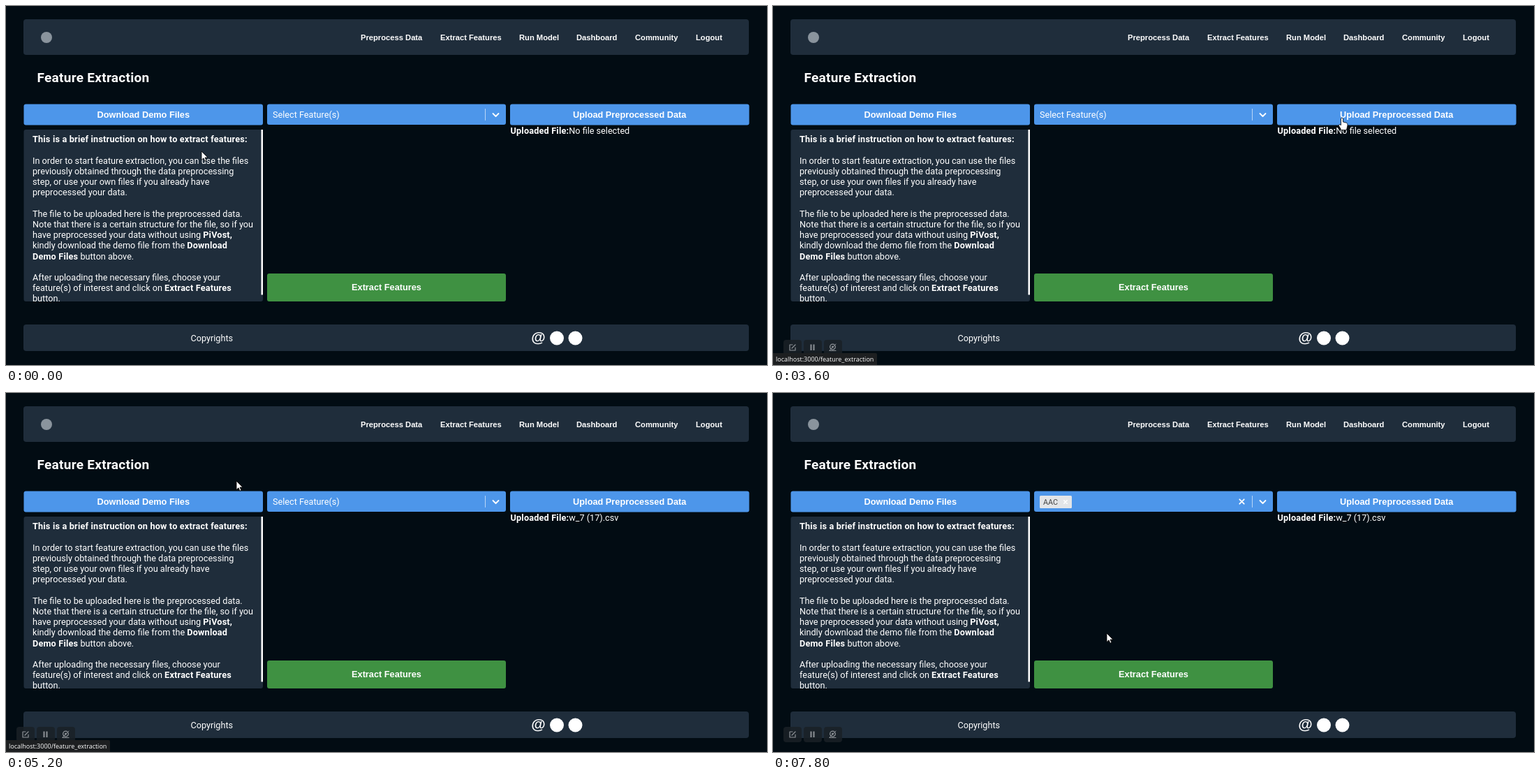
Animation, 1090 px wide and 514 px high, one loop 8000 ms. Source, as an HTML page:

```html
<!DOCTYPE html>
<html lang="en">
<head>
<meta charset="utf-8">
<title>Feature Extraction</title>
<style>
html, body { margin: 0; height: 100%; overflow: hidden; background: #020c13; }
svg { display: block; width: 100vw; height: 100vh; }
text { white-space: pre; fill: #fff; }
.body { font-family: Roboto, sans-serif; }
.body.b, .body .b { font-weight: 700; letter-spacing: .015em; }
.btn { font-family: "Liberation Sans", Arial, sans-serif; font-weight: 700; }
.ui { font-family: "Open Sans", "Noto Sans", sans-serif; }
.line { fill: none; stroke-linecap: round; stroke-linejoin: round; }
.shadow { filter: drop-shadow(0 4px 9px #000); }
</style>
</head>
<body>
<svg id="stage" viewBox="0 0 1090 514"></svg>
<script>
const CARD = '#1f2d3b', BLUE = '#4d96ea', GREEN = '#1d8a50', FOLDER = '#f7cd62';

const rect = (x, y, w, h, fill, more = '') =>
  `<rect x="${x}" y="${y}" width="${w}" height="${h}" fill="${fill}" ${more}/>`;
const circle = (x, y, r, fill) => `<circle cx="${x}" cy="${y}" r="${r}" fill="${fill}"/>`;
const line = (d, color = '#fff', w = 1) =>
  `<path class="line" d="${d}" stroke="${color}" stroke-width="${w}"/>`;
const shape = (d, fill) => `<path d="${d}" fill="${fill}"/>`;
// y is the middle of the capitals
const text = (cls, size, x, y, str, more = '') =>
  `<text class="${cls}" font-size="${size}" x="${x}" y="${y + size * .35}" ${more}>${str}</text>`;
const group = (id, inner, more = '') => `<g id="${id}" ${more}>${inner}</g>`;

const MID = 'text-anchor="middle"', END = 'text-anchor="end"';
const body = (x, y, str, more) => text('body', 12.67, x, y, str, more);
const ui = (x, y, str, more) => text('ui', 9, x, y, str, more);
const chevron = (x, y, r, color, w) =>
  line(`M${x - r} ${y - r / 2}l${r} ${r} ${r} ${-r}`, color, w);
const arrowRight = (x, y, color) => line(`M${x - 1.5} ${y - 3}l3 3-3 3`, color);
const cross = (x, y, r, color, w) =>
  line(`M${x - r} ${y - r}l${2 * r} ${2 * r}m0 ${-2 * r}l${-2 * r} ${2 * r}`, color, w);
const folder = (x, y, fill = FOLDER) =>
  shape(`M${x - 6} ${y - 5}h4l2 2h6v8h-12z`, fill);
const sheet = (x, y) => rect(x - 5, y - 5, 10, 10, GREEN);

function page() {
  const nav = [[508, 'Preprocess Data'], [622, 'Extract Features'], [735, 'Run Model'],
    [817, 'Dashboard'], [901, 'Community'], [988, 'Logout']];
  const b = s => `<tspan class="b">${s}</tspan>`;
  const help = [
    b('This is a brief instruction on how to extract features:'), '',
    'In order to start feature extraction, you can use the files',
    'previously obtained through the data preprocessing',
    'step, or use your own files if you already have',
    'preprocessed your data.', '',
    'The file to be uploaded here is the preprocessed data.',
    'Note that there is a certain structure for the file, so if you',
    `have preprocessed your data without using ${b('PiVost,')}`,
    `kindly download the demo file from the ${b('Download')}`,
    `${b('Demo Files')} button above.`, '',
    'After uploading the necessary files, choose your',
    `feature(s) of interest and click on ${b('Extract Features')}`,
    'button.'];
  const button = (x, y, w, h, fill, label) =>
    rect(x, y, w, h, fill, 'rx="3"') + text('btn', 12.75, x + w / 2, y + h / 2, label, MID);
  return rect(0, 0, 1090, 514, '#020c13')
    + rect(25, 19, 1039, 51, CARD, 'rx="4"')
    + circle(58, 45, 8, '#8a949d')
    + nav.map(([x, s]) => text('btn', 11.2, x, 45, s)).join('')
    + text('body b', 19, 44.5, 102, 'Feature Extraction')
    + button(25.5, 140.5, 342.5, 30, BLUE, 'Download Demo Files')
    + rect(374, 140.5, 342, 29.5, BLUE, 'rx="3"')
    + line('M686.5 147.5V163.5', '#b9d5f7') + chevron(701.5, 156, 4, '#fff', 1.8)
    + button(722, 140.5, 342.5, 30, BLUE, 'Upload Preprocessed Data')
    + rect(25.5, 177, 342.5, 246, CARD, 'rx="3"')
    + '<clipPath id="clip"><rect x="25" y="177" width="343" height="246"/></clipPath>'
    + group('help', help.map((s, i) => body(38, 191 + i * 15.2, s)).join(''),
      'clip-path="url(#clip)"')
    + rect(365.5, 177, 2.5, 236.5, '#fff')
    + button(374, 383, 342, 40, '#3f9142', 'Extract Features')
    + rect(25, 456, 1039, 38, CARD, 'rx="4"')
    + body(264.5, 475.5, 'Copyrights')
    + text('btn', 21, 762.5, 473.3, '@', MID)
    + circle(789, 475.5, 10, '#fff') + circle(815.5, 475.5, 10, '#fff')
    + group('noFile', body(722.5, 178.5, b('Uploaded File:') + 'No file selected'))
    + group('file', body(722.5, 178.5, b('Uploaded File:') + 'w_7 (17).csv'))
    + group('hint', body(382, 155.5, 'Select Feature(s)'))
    + group('tag', rect(382, 147, 46, 18, '#e3e5e8', 'rx="1.5"')
      + text('body', 10.8, 387, 156, 'AAC', 'style="fill:#444"')
      + cross(419, 156, 2.2, '#fff', 1.5) + cross(671.5, 155.5, 3.2, '#fff', 1.8));
}

function toolbar() {
  const c = '#8d9297';
  return [15, 44, 73].map(x => rect(x, 478, 26, 22, '#1a2127', 'rx="4" opacity=".85"')).join('')
    + line('M28 485h-4v8h8v-4M27 490l5-5', c, 1.2)
    + rect(53.5, 484.5, 2, 8.5, c) + rect(57.5, 484.5, 2, 8.5, c)
    + `<circle cx="85.5" cy="488" r="3.8" fill="none" stroke="${c}" stroke-width="1.3"/>`
    + circle(85.5, 488, 1.5, c) + line('M81 493.5h9M81 493l9-9', c);
}

function popup() {
  const item = (y, name) => sheet(773, y + 1)
    + text('ui', 9.9, 792, y, name, 'style="fill:#f0f0f0"')
    + ui(792.5, y + 15, '11.5 KB • Done', 'style="fill:#a9a9a9"');
  return shape('M751 0H1006V93q0 3-3 3H754q-3 0-3-3z', '#292929')
    + rect(751, 0, 255, 45, '#424242')
    + item(16, 'w_7 (17).csv') + item(60.5, 'w_7 (16).csv')
    + folder(958.5, 61.5, '#b5b5b5')
    + line('M983 57.5h-3.5v8.5h8.5v-3.5M983.5 62l4.5-4.5M985 57.5h3v3', '#b5b5b5', 1.2);
}

function blankDialog() {
  return rect(125, 3, 690.5, 468, '#3a3939', 'rx="6"')
    + shape('M125 27V9q0-6 6-6H809.5q6 0 6 6V27z', '#000')
    + circle(138, 15, 6, '#4285f4') + ui(148, 15, 'Open') + cross(803.5, 15, 3.7, '#ddd')
    + rect(125, 27, 690.5, 383.5, '#fff')
    + rect(234, 95, 13.5, 315.5, '#191919') + rect(240, 108, 1.6, 254, '#999')
    + rect(802, 108, 13.5, 290, '#191919') + rect(808.3, 108, 1.5, 95, '#999')
    + [[227, 421, 42, 12], [273, 417.5, 372.5, 19], [655, 417.5, 147, 18.5],
      [655, 440.5, 69, 20.5], [733, 440.5, 69, 20.5], [802, 457, 13.5, 13]]
      .map(r => rect(...r, '#fff')).join('');
}

function dialog() {
  const files = [
    ['w_7 (17)', '9:38', 12], ['w_7 (16)', '9:37', 12], ['w_11 (1)', '9:31', 14],
    ['w_7 (15)', '9:31', 10], ['sites_proteins (17)', '9:31', 128], ['w_7 (14)', '9:30', 11],
    ['w_13', '9:30', 16], ['sites_proteins (16)', '9:29', 128], ['w_9 (3)', '9:01', 14],
    ['w_7 (13)', '9:01', 12], ['sites_proteins (15)', '9:01', 128],
    ['sites_proteins (14)', '8:43', 128]];
  const rows = files.map(([name, time, kb], i) => {
    const y = 128 + i * 24.73;
    return sheet(267.5, y) + ui(277.5, y, name) + ui(469, y, `9/27/2023 ${time} AM`)
      + ui(584, y, 'Merrowick Sheet C...') + ui(733, y, `${kb} KB`, END);
  }).join('');

  const screen = (x, y) => rect(x - 6, y - 5, 12, 8, '#2ba3e8') + rect(x - 3, y + 4, 6, 1.2, '#2ba3e8');
  const disk = (x, y) => rect(x - 6, y - 1, 12, 4, '#c9ced3', 'rx="1"');
  const places = [
    ['Desktop', (x, y) => rect(x - 6, y - 4.5, 12, 9, '#2f9ff0', 'rx="1"') + rect(x - 4, y + 1, 8, 1.2, '#fff')],
    ['Documents', (x, y) => rect(x - 4.5, y - 6, 9, 12, '#a9bccb', 'rx="1"') + line(`M${x - 2} ${y - 2}h4m-4 2.5h4m-4 2.5h4`, '#fff')],
    ['Downloads', (x, y) => line(`M${x} ${y - 5}v8m-3.5-3.5l3.5 3.5 3.5-3.5M${x - 4.5} ${y + 6}h9`, '#24b79a', 1.4)],
    ['Music', (x, y) => circle(x, y, 6, '#e0704f') + circle(x - 1, y + 2, 1.5, '#fff') + line(`M${x + .5} ${y + 2}v-5l2 1`)],
    ['Pictures', (x, y) => rect(x - 6, y - 5.5, 12, 11, '#1f83dc', 'rx="1"') + shape(`M${x - 5} ${y + 5}l5-6 5 6z`, '#d5ecff')],
    ['Videos', (x, y) => rect(x - 6, y - 5.5, 12, 11, '#8149cf', 'rx="1"') + shape(`M${x - 2} ${y - 3}l5 3-5 3z`, '#fff')],
    ['Local Disk (C:)', (x, y) => disk(x, y + 1) + rect(x - 5, y - 4.5, 4, 3.5, '#2ba3e8')],
    ['HDD (D:)', disk]];
  const tree = places.map(([name, icon], i) => {
    const y = 221.5 + i * 25.6;
    return arrowRight(137.5, y, '#888') + icon(156, y) + ui(166.5, y, name);
  }).join('');

  const crumbs = [[265, 'This PC'], [315, 'HDD (D:)'], [371, 'Downloads'], [436, 'Chrome_Downloads']]
    .map(([x, s]) => ui(x, 45.5, s)).join('')
    + [256, 306, 362, 427, 530.5].map(x => arrowRight(x, 45.5, '#ddd')).join('');
  const frame = (x, y, w, h, fill, color, r = 0) =>
    rect(x + .5, y + .5, w, h, fill, `stroke="${color}" rx="${r}"`);

  return rect(119.5, -6, 703.5, 481.5, '#191919', 'rx="6"')
    + rect(119.5, 0, 703.5, 24, '#000')
    + circle(132.5, 11.5, 6, '#4285f4') + ui(143, 11.5, 'Open') + cross(810.5, 11.5, 3.8, '#ddd')
    + line('M141 45.5h-9m3.5-3.5l-3.5 3.5 3.5 3.5M212 50v-9m-3.5 3.5l3.5-3.5 3.5 3.5', '#ddd', 1.2)
    + line('M160 45.5h9m-3.5-3.5l3.5 3.5-3.5 3.5', '#ddd', 1.2)
    + chevron(188.5, 45.5, 3, '#aaa')
    + frame(229, 32, 412.5, 26.5, '#191919', '#4d4d4d') + folder(243, 44.5) + crumbs
    + chevron(597, 46.5, 3, '#ccc')
    + line('M629.5 43.5a4 4 0 1 0 1 3.5M630 41v3h-3', '#ddd', 1.2)
    + frame(652, 32, 160.5, 26.5, '#191919', '#4d4d4d')
    + line('M667 48l3-3m0 0a3 3 0 1 1 2 1q-1 0-2-1', '#999')
    + ui(684.5, 45.5, 'Search Chrome_Downloads', 'style="fill:#8c8c8c"')
    + rect(119.5, 68, 703.5, 25, '#202020')
    + ui(134, 80, 'Organize') + shape('M176 78.5h6.5l-3.2 3.5z', '#ccc') + ui(206.5, 80, 'New folder')
    + frame(725, 74, 12, 11, '#d4d4d4', '#d4d4d4') + line('M727 77h9m-9 3h9m-9 3h9', '#333')
    + shape('M745.5 78.5h6.5l-3.2 3.5z', '#ccc')
    + rect(769, 75, 13, 10, '#e8e8e8') + rect(776, 77, 5, 7, '#2b91d8')
    + circle(804.5, 80, 6.3, '#1787d6') + ui(804.5, 80, '?', MID)
    + folder(156, 106.5) + ui(166.5, 106.5, 'plumber-apis')
    + folder(156, 132) + ui(166.5, 132, 'win_files')
    + arrowRight(131.5, 164, '#888') + circle(150, 164.5, 5, '#1683d8') + ui(160, 164, 'AirCrate - Perso')
    + chevron(131.5, 196, 3, '#ddd') + screen(150, 196) + ui(160.5, 196, 'This PC')
    + rect(121.5, 389.5, 109, 22, '#373737') + tree
    + rect(237, 202, 1.8, 165.5, '#999') + rect(245.5, 93, 1, 321, '#333')
    + ui(271, 103, 'Name') + ui(469, 103, 'Date modified') + ui(584, 103, 'Type') + ui(680, 103, 'Size')
    + chevron(521.5, 95, 2.2, '#999')
    + [464, 579, 674.5, 738.5].map(x => rect(x - .5, 93, 1, 19.5, '#5a5a5a')).join('')
    + rows + rect(815.5, 106, 1.8, 42, '#999')
    + shape('M119.5 414H823V469.5q0 6-6 6H125.5q-6 0-6-6z', '#363636')
    + ui(266.5, 431, 'File name:', END)
    + frame(270.5, 421, 378, 19, '#363636', '#d0d0d0') + rect(274, 425, 1, 12, '#fff')
    + chevron(642, 432, 2.8, '#ccc')
    + frame(659, 421, 149.5, 18.5, '#363636', '#999')
    + ui(662, 431, 'Merrowick Sheet Comma Separa') + chevron(802, 431.5, 2.8, '#ccc')
    + frame(660, 445, 68, 19, '#363636', '#fff', 2) + ui(694, 455, 'Open', MID)
    + frame(740, 445, 68, 19, '#363636', '#9c9c9c', 2) + ui(774, 455, 'Cancel', MID)
    + [[0, 0], [0, 3], [0, 6], [-3, 3], [-3, 6], [-6, 6]]
      .map(([x, y]) => rect(819 + x, 467 + y, 1.6, 1.6, '#ccc')).join('');
}

const outline = 'fill="#fff" stroke="#000" stroke-width=".8" stroke-linejoin="round"';
document.getElementById('stage').innerHTML = page()
  + group('tools', toolbar())
  + group('status', rect(-2, 497, 151, 19, '#1d1f21', 'rx="2"') + ui(4, 505.5, 'localhost:3000/feature_extraction'))
  + group('popup', popup(), 'class="shadow"')
  + group('blank', blankDialog(), 'class="shadow"')
  + group('dialog', dialog(), 'class="shadow"')
  + group('cursor',
    `<path id="arrow" ${outline} d="M0 0V12.5L3 9.8 5 14.2 7 13.3 5 9H9Z"/>`
    + `<path id="hand" ${outline} d="M-1.5 1Q0-1 1.5 1V6L6.5 7.2Q8.3 8 8 11L6.5 17.5H-1L-4.5 11.5Q-5 8.5-1.5 10.5Z"/>`);

const $ = id => document.getElementById(id);
// time, x, y of the pointer tip
const route = [[0, 280, 208], [1000, 288, 159], [1600, 288, 159], [2600, 841, 71], [2800, 841, 71],
  [3400, 815, 160], [3800, 815, 160], [4000, 801, 184], [4600, 380, 140], [5000, 330, 126],
  [5200, 330, 126], [5800, 574, 159], [6200, 574, 159], [6600, 430, 186], [7200, 430, 186],
  [7800, 478, 344], [8000, 478, 344]];

function pointer(t) {
  const i = route.findIndex(k => k[0] > t);
  const [t0, x0, y0] = route[i - 1], [t1, x1, y1] = route[i];
  const p = (t - t0) / (t1 - t0), e = p * p * (3 - 2 * p);
  return [x0 + (x1 - x0) * e, y0 + (y1 - y0) * e];
}

function draw(now) {
  const t = Math.floor(now % 8000 / 200) * 200;
  const during = (a, b) => t >= a && t < b;
  const show = (id, on) => $(id).setAttribute('opacity', +on);
  const hand = during(800, 1800) || during(3400, 4000) || during(5800, 6600);
  show('tools', t >= 400);
  show('status', during(5800, 6200) ? .6 : during(800, 1800) || during(3400, 5800));
  show('popup', during(1800, 3200));
  show('blank', during(4000, 4200));
  show('dialog', during(4200, 5200));
  show('noFile', t < 5200);
  show('file', t >= 5200);
  show('hint', t < 6800);
  show('tag', t >= 6800);
  show('hand', hand);
  show('arrow', !hand);
  $('cursor').setAttribute('transform', `translate(${pointer(t)})`);
  requestAnimationFrame(draw);
}
requestAnimationFrame(draw);
</script>
</body>
</html>
```
